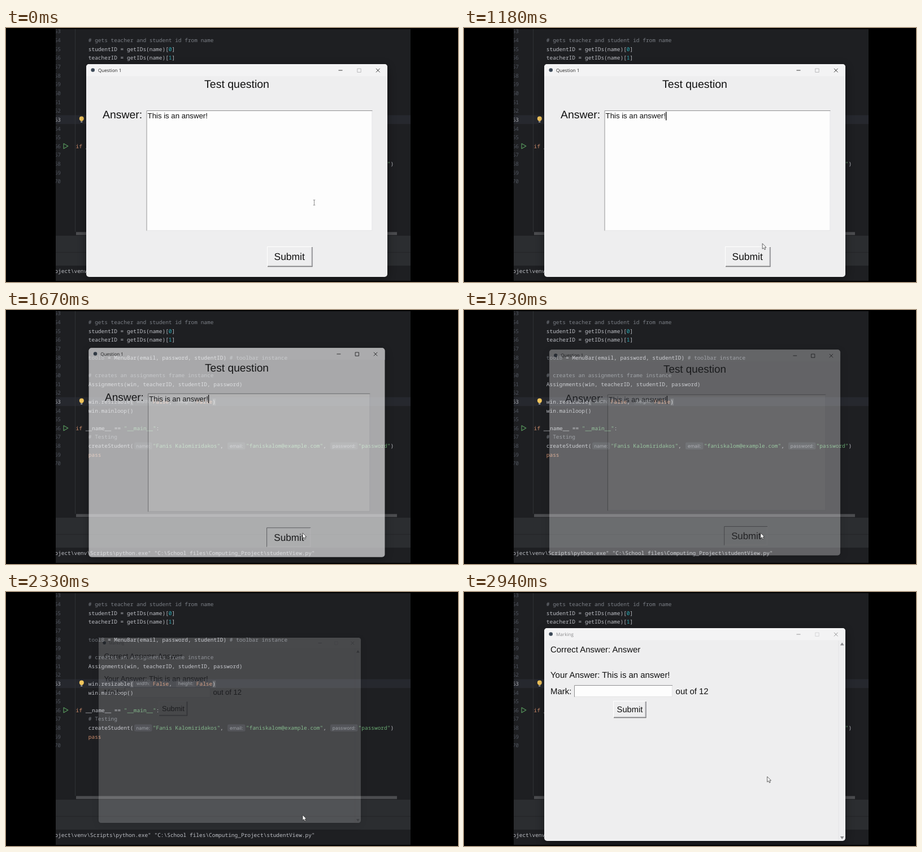
These frames come from a looping animation (800x450 px, 3790 ms). An HTML page:

```html
<!DOCTYPE html>
<html lang="en">
<head>
<meta charset="utf-8">
<title>Quiz windows over a code editor</title>
<style>
  html, body { margin: 0; width: 100%; height: 100%; overflow: hidden; background: #000; }
  svg { display: block; width: 100vw; height: 100vh; }
  text { white-space: pre; text-rendering: geometricPrecision; }
  .code { font: 500 9.48px "Noto Sans Mono", "DejaVu Sans Mono", monospace; fill: #bcbec4; }
  .hint { font: 8.4px Inter, sans-serif; fill: #868a91; }
  .title { font: 8.15px "Open Sans", sans-serif; }
  .ui { font-family: "Liberation Sans", Arial, sans-serif; fill: #111; }
</style>
</head>
<body>
<svg viewBox="0 0 800 450" id="stage">
  <defs>
    <clipPath id="screen"><rect x="88" y="2" width="628" height="446"/></clipPath>
    <filter id="blur" x="-20%" y="-20%" width="140%" height="140%"><feGaussianBlur stdDeviation="8"/></filter>
  </defs>
  <rect width="800" height="450" fill="#000"/>
  <g clip-path="url(#screen)">
    <g id="editor"></g>
    <g id="question"></g>
    <g id="marking"></g>
    <path id="beam" d="M-1.8-4.5H1.8M-1.8 4.5H1.8M0-4.5V4.5" fill="none" stroke="#777" stroke-width=".8"/>
    <path id="arrow" d="M0 0V9.6L2.2 7.6L3.8 11L5.5 10.2L4 7H6.8Z" fill="#fff" stroke="#222" stroke-width=".7" stroke-linejoin="round"/>
  </g>
</svg>
<script>
const LOOP = 3790;
const $ = id => document.getElementById(id);
const clamp = (v, lo = 0, hi = 1) => Math.min(hi, Math.max(lo, v));
const mix = (a, b, u) => a + (b - a) * u;
const smooth = u => u * u * (3 - 2 * u);
const esc = s => s.replace(/&/g, '&amp;').replace(/</g, '&lt;');

const rect = (x, y, w, h, fill, extra = '') =>
  `<rect x="${x}" y="${y}" width="${w}" height="${h}" fill="${fill}" ${extra}/>`;
const path = (d, stroke, w = 1, extra = '') =>
  `<path d="${d}" fill="none" stroke="${stroke}" stroke-width="${w}" ${extra}/>`;
const ui = (x, y, size, s, extra = '') =>
  `<text class="ui" x="${x}" y="${y}" font-size="${size}" ${extra}>${esc(s)}</text>`;

// Editor
const INK = { c: '#7a7e85', k: '#cf8e6d', n: '#2aacb8', s: '#6aab73', u: '#6f737a', t: '#bcbec4' };
const lineY = n => 21.7 + (n - 54) * 15.65;

// Parts alternate between an ink key and the text drawn in it.
function code(x, n, ...parts) {
  let spans = '';
  for (let i = 0; i < parts.length; i += 2)
    spans += `<tspan fill="${INK[parts[i]]}">${esc(parts[i + 1])}</tspan>`;
  return `<text class="code" x="${x}" y="${lineY(n) + 3.3}">${spans}</text>`;
}
const hint = (x, n, w, s) => rect(x, lineY(n) - 6.3, w, 12.4, '#2e3035', 'rx="2.5"') +
  `<text class="hint" x="${x + w / 2}" y="${lineY(n) + 2.7}" text-anchor="middle">${s}</text>`;

function editor() {
  const X = 145.8;
  let out = rect(88, 2, 628, 446, '#1e1f22') + rect(88, 154.5, 628, 15.6, '#26282e') +
    rect(122, 2, 1, 359, '#2f3135');
  for (let n = 53; n <= 70; n++)
    out += `<text class="code" x="97" y="${lineY(n) + 3.3}" text-anchor="end" style="fill:${n === 63 ? '#a9abb3' : '#4f545d'}">${n}</text>`;
  out += rect(220, 157, 5.6, 12, '#43454a') + rect(365.6, 157, 5.6, 12, '#43454a');
  out += code(X, 54, 'c', '# gets teacher and student id from name') +
    code(X, 55, 't', 'studentID = getIDs(name)[', 'n', '0', 't', ']') +
    code(X, 56, 't', 'teacherID = getIDs(name)[', 'n', '1', 't', ']') +
    code(X, 58, 'u', 'toolB', 't', ' = MenuBar(email, password, studentID) ', 'c', '# toolbar instance') +
    code(X, 60, 'c', '# creates an assignments frame instance') +
    code(X, 61, 't', 'Assignments(win, teacherID, studentID, password)') +
    code(X, 63, 't', 'win.resizable(') + hint(227, 63, 31.5, 'width:') +
    code(259.8, 63, 'k', 'False', 't', ',') + hint(301, 63, 34.5, 'height:') +
    code(336.8, 63, 'k', 'False', 't', ')') +
    code(X, 64, 't', 'win.mainloop()') +
    code(123.6, 66, 'k', 'if', 't', ' __name__ == ', 's', '"__main__"', 't', ':') +
    code(X, 67, 'c', '# Testing') +
    code(X, 68, 't', 'createStudent(') + hint(227, 68, 31.5, 'name:') +
    code(259.8, 68, 's', '"Fanis Kalomiridakos"', 't', ',') + hint(392, 68, 31.5, 'email:') +
    code(424.8, 68, 's', '"faniskalom@example.com"', 't', ',') + hint(574, 68, 48.5, 'password:') +
    code(623.6, 68, 's', '"password"', 't', ')') +
    code(X, 69, 'k', 'pass');
  // Run marker and bulb
  out += path('M102 204.8L109.8 209.3L102 213.8Z', '#57965c', 1.2, 'stroke-linejoin="round"') +
    '<circle cx="133.8" cy="160.4" r="4" fill="#f2c55c"/>' +
    rect(131.9, 163.2, 3.6, 1.8, '#f2c55c') + rect(132.1, 165.8, 3.2, 1.3, '#ced0d6');
  // Scrollbar and lower panels
  out += rect(124, 361.5, 568, 5.3, '#4b4c4f') + rect(88, 368, 628, 54, '#2b2d30') +
    rect(88, 397, 628, 1, '#232427') + rect(88, 421, 628, 27, '#1e1f22');
  const cmd = String.raw`Project\venv\Scripts\python.exe" "C:\School files\Computing_Project\studentView.py"`;
  return out + `<text class="code" x="75" y="433.7">${esc(cmd)}</text>`;
}

// Windows
const CX = 408.5, CY = 252.5;

function frame(title, ink, maxInk, body) {
  return rect(142, 68, 533, 377, '#000', 'rx="6" opacity=".42" filter="url(#blur)"') +
    rect(142, 64, 533, 377, '#eeeeef', 'rx="5"') +
    '<path d="M142 85.5V69A5 5 0 0 1 147 64H670A5 5 0 0 1 675 69V85.5Z" fill="#f3f3f4"/>' +
    '<circle cx="153.7" cy="74.5" r="3.3" fill="#3b4856"/>' +
    `<text class="title" x="163" y="77.6" fill="${ink}">${title}</text>` +
    path('M588.5 75H595.5', ink, .9) +
    path('M621.8 72H628.2V78.4H621.8Z', maxInk, .9, 'class="max"') +
    path('M655 71.8L661.6 78.4M661.6 71.8L655 78.4', ink, .9) + body;
}

// Raised or sunken bevel
function bevel(x, y, w, h, light, dark) {
  return path(`M${x + .5} ${y + h}V${y + .5}H${x + w}`, light) +
    path(`M${x + 1} ${y + h - .5}H${x + w - .5}V${y + 1}`, dark, 1.3);
}
const button = (x, y, w, h) => bevel(x, y, w, h, '#fff', '#77777a') +
  path(`M${x + 1.5} ${y + h - 1.7}H${x + w - 1.7}V${y + 1}`, '#b4b4b6', .7);
const field = (x, y, w, h) => rect(x, y, w, h, '#fdfdfd') + bevel(x, y, w, h, '#8f8f91', '#e6e6e8');

$('editor').innerHTML = editor();

$('question').innerHTML = frame('Question 1', '#222', '#b5b5b7',
  ui(CX, 106.4, 19.5, 'Test question', 'text-anchor="middle"') +
  ui(171, 159.8, 19.4, 'Answer:') + field(248.5, 146, 400, 213.3) +
  ui(250.6, 160.4, 13.2, 'This is an answer!') + rect(357, 148.5, 1.4, 15, '#111', 'id="caret"') +
  `<g id="up">${button(462, 387, 80.5, 36)}${ui(474.6, 411, 17.4, 'Submit')}</g>` +
  `<g id="down">${bevel(462, 387.6, 79.5, 35, '#77777a', '#f8f8f8')}${ui(475.4, 411.8, 17.4, 'Submit')}</g>`);

$('marking').innerHTML = frame('Marking', '#8c8c8e', '#d2d2d4',
  ui(153, 106.5, 14.93, 'Correct Answer: Answer') +
  ui(153, 152.2, 14.93, 'Your Answer: This is an answer!') +
  ui(153, 180.5, 14.93, 'Mark:') + field(195, 165, 174, 21) + ui(374.6, 180.5, 14.93, 'out of 12') +
  button(264, 193, 58.5, 30) + ui(270.6, 213.4, 14.7, 'Submit') +
  rect(662.5, 86, .8, 354, '#e2e2e4') +
  '<path d="M665.8 94.5L669.2 89.5L672.6 94.5ZM665.8 433L669.2 438L672.6 433Z" fill="#8a8a8d"/>');

const maxBox = $('question').querySelector('.max');
const show = (el, on) => el.setAttribute('visibility', on ? 'inherit' : 'hidden');

function place(el, alpha, scale, dx = 0, dy = 0) {
  el.setAttribute('display', alpha > 0 ? 'inline' : 'none');
  el.setAttribute('opacity', alpha);
  el.setAttribute('transform', `translate(${CX + dx} ${CY + dy}) scale(${scale}) translate(${-CX} ${-CY})`);
}

function pointer(t) {
  if (t < 2400) {
    const u = smooth(clamp((t - 730) / 600));
    return [mix(545.5, 525, u), mix(309.3, 395, u)];
  }
  const u = clamp((t - 2400) / 540);
  return [mix(525, 536.7, u), mix(395, 327, u)];
}

function draw(t) {
  const closing = t < 1640 ? 0 : clamp((t - 1610) / 180);
  place($('question'), 1 - closing, 1 - .05 * closing);

  const fade = t < 2330 ? 0 : clamp(.19 + (t - 2330) / 190);
  const rest = (1 - clamp((t - 2330) / 240)) ** 3;
  place($('marking'), fade, 1 - .131 * rest, -12.7 * rest, -7.6 * rest);

  const pressed = t >= 1450;
  show($('up'), !pressed);
  show($('down'), pressed);
  show($('caret'), t >= 1000);
  maxBox.setAttribute('stroke', t >= 1550 ? '#222' : '#b5b5b7');

  const [x, y] = pointer(t);
  const typing = t < 1640 && y < 359;
  for (const id of ['beam', 'arrow']) $(id).setAttribute('transform', `translate(${x} ${y})`);
  show($('beam'), typing);
  show($('arrow'), !typing);
}

const start = performance.now();
function tick() {
  draw((performance.now() - start) % LOOP);
  requestAnimationFrame(tick);
}
tick();
</script>
</body>
</html>
```
